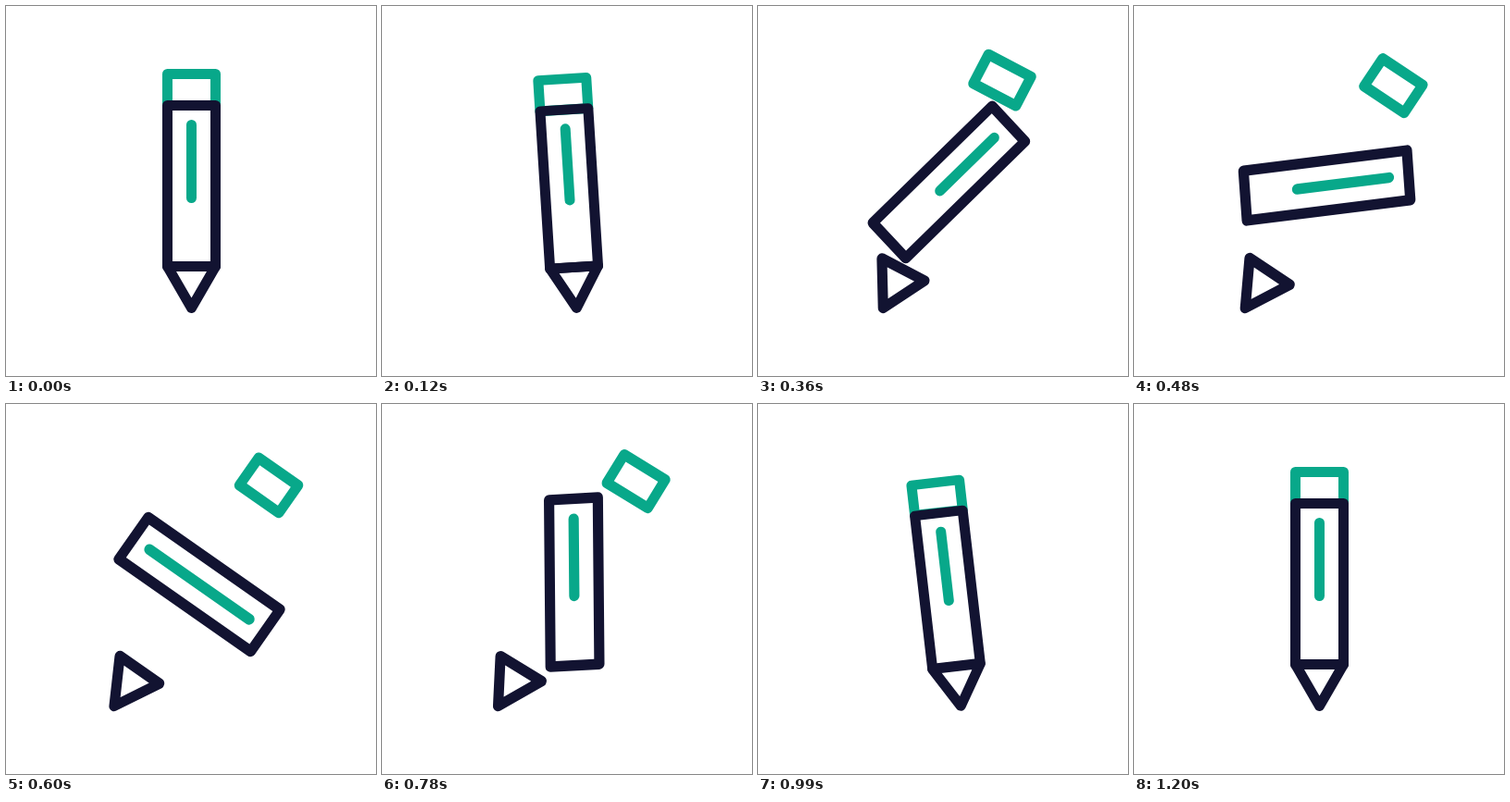
These frames come from a looping animation (400x400 px, 1.26 s). An HTML page with a canvas:

```html
<!DOCTYPE html>
<html lang="en">
<head>
<meta charset="utf-8">
<title>Pencil</title>
<style>
  html, body { margin: 0; width: 100%; height: 100%; overflow: hidden; background: #fff; }
  canvas { display: block; width: 400px; height: 400px; }
</style>
</head>
<body>
<canvas id="stage" width="400" height="400"></canvas>
<script>
const ctx = document.getElementById('stage').getContext('2d');
const DARK = '#121331', GREEN = '#08a88a';
const LOOP = 1260, STEP = 30, END = 1200;

// Measurements relative to the pencil's point, y pointing down.
const POINT = { x: 200.5, y: 326.5 };
const HALF = 26, NECK = -45, TOP = -219, CAP_TOP = -253;
const MIDDLE = (NECK + TOP) / 2;

const REST = { angle: 0, shift: 0, stretch: 1 };
const CROUCH = { angle: -10, shift: 27.4, stretch: 0.946 };
const REACH = { angle: 35, shift: -83.5, stretch: 1.06 };
const SPREAD = 19.4;

const clamp = v => Math.min(1, Math.max(0, v));
const mix = (a, b, k) => a + (b - a) * k;
const smooth = v => { v = clamp(v); return v * v * (3 - 2 * v); };

function bezier(x1, y1, x2, y2) {
  const at = (a, b, s) => 3 * a * s * (1 - s) ** 2 + 3 * b * s * s * (1 - s) + s ** 3;
  return x => {
    let low = 0, high = 1;
    for (let i = 0; i < 24; i++) {
      const s = (low + high) / 2;
      if (at(x1, x2, s) < x) low = s; else high = s;
    }
    return at(y1, y2, low);
  };
}
const launch = bezier(0.167, 0.5, 0.2, 1);

function blend(a, b, k) {
  return {
    angle: mix(a.angle, b.angle, k),
    shift: mix(a.shift, b.shift, k),
    stretch: mix(a.stretch, b.stretch, k)
  };
}

// The lean is the same forwards and backwards around the middle at 600 ms.
function poseAt(time) {
  const t = 600 - Math.abs(time - 600);
  if (t <= 200) return { ...blend(REST, CROUCH, (t / 200) ** 2), gap: 0 };
  const k = launch((t - 200) / 400);
  return { ...blend(CROUCH, REACH, k), gap: SPREAD * k ** 1.25 };
}

function stroke(color, points, closed = true) {
  ctx.beginPath();
  points.forEach(([x, y]) => ctx.lineTo(x, y));
  if (closed) ctx.closePath();
  ctx.strokeStyle = color;
  ctx.stroke();
}

const box = (top, bottom) => [[-HALF, top], [HALF, top], [HALF, bottom], [-HALF, bottom]];

function draw(time) {
  const pose = poseAt(time);
  ctx.setTransform(1, 0, 0, 1, 0, 0);
  ctx.fillStyle = '#fff';
  ctx.fillRect(0, 0, 400, 400);
  ctx.lineWidth = 11;
  ctx.lineCap = ctx.lineJoin = 'round';

  ctx.translate(POINT.x + pose.shift, POINT.y);
  ctx.rotate(pose.angle * Math.PI / 180);
  ctx.scale(1, pose.stretch);

  stroke(GREEN, box(CAP_TOP - 2 * pose.gap, TOP - 2 * pose.gap));
  stroke(DARK, [[-HALF, NECK], [HALF, NECK], [0, 0]]);

  // The body makes a half turn while its line slides to the other end.
  ctx.translate(0, MIDDLE - pose.gap);
  ctx.rotate(Math.PI * smooth((time - 200) / 800));
  const tail = mix(-66, -13, smooth((time - 600) / 200));
  const head = mix(13, 66, smooth((time - 400) / 200));
  stroke(GREEN, [[0, tail], [0, head]], false);
  stroke(DARK, box(TOP - MIDDLE, NECK - MIDDLE));
}

function tick() {
  const t = performance.now() % LOOP;
  draw(Math.min(END, Math.floor(t / STEP) * STEP));
  requestAnimationFrame(tick);
}
tick();
</script>
</body>
</html>
```
